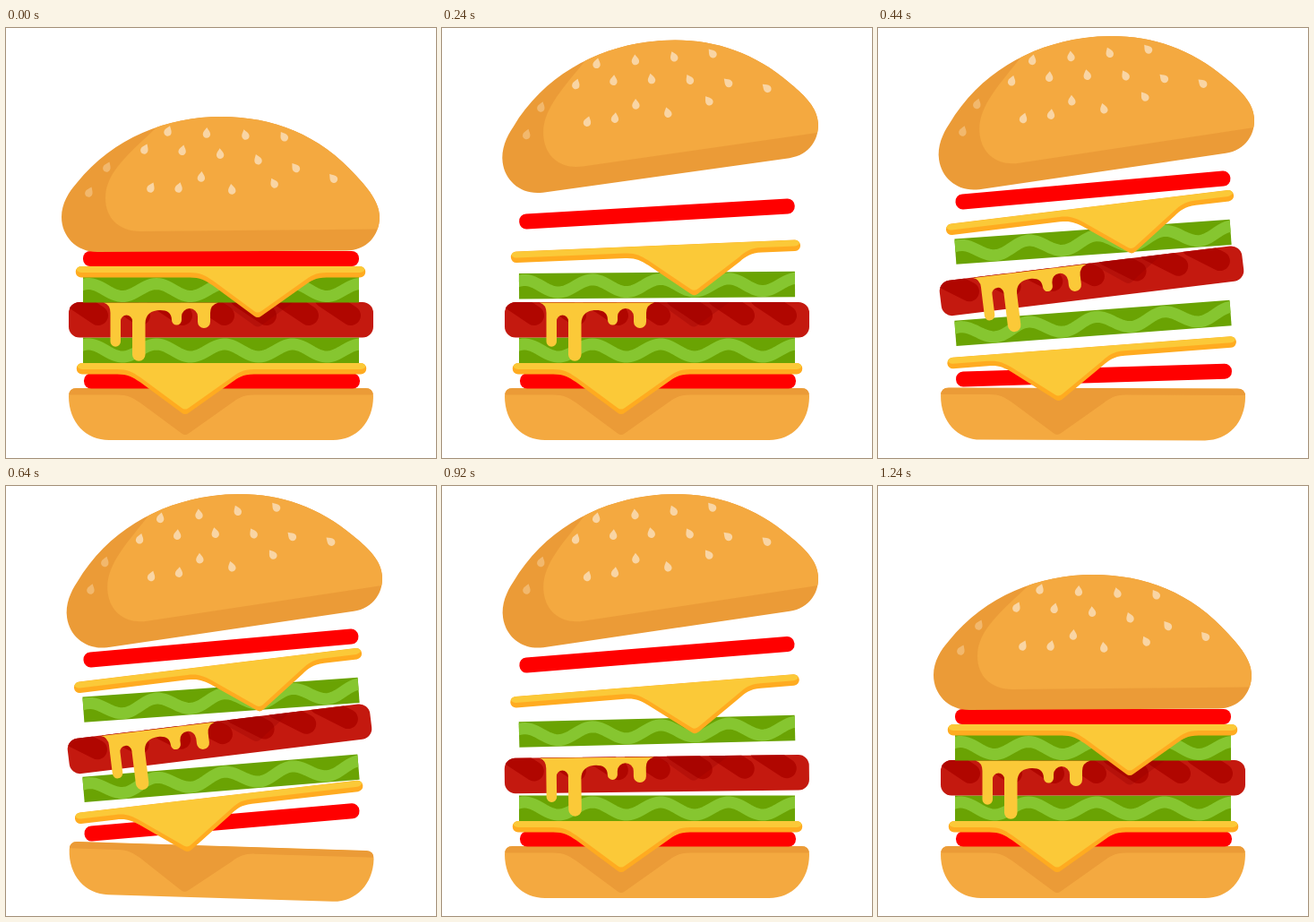
An HTML page that plays this animation: 480 px wide and 480 px high, repeating every 1360 ms.

```html
<!DOCTYPE html>
<html lang="en">
<head>
<meta charset="utf-8">
<title>Burger</title>
<style>
  html, body { margin: 0; width: 100%; height: 100%; overflow: hidden; background: #fff; }
  svg { display: block; width: 100vw; height: 100vh; }
</style>
</head>
<body>
<svg viewBox="0 0 480 480">
  <defs id="clips"></defs>
  <g id="burger"></g>
</svg>
<script>
const LOOP = 1360, STEP = 40, TURN = 600;
const BUN = '#f4a940', CRUST = '#eb9b37', SEED = '#f9d5a4';
const TOMATO = '#ff0000', CHEESE = '#fbc938', RIND = '#ffab20';
const LEAF = '#6aa303', LEAF_LIGHT = '#86c630', MEAT = '#c4190f', CHAR = '#b00600';

const clips = document.getElementById('clips');
const burger = document.getElementById('burger');
let clipCount = 0;

const clamp = (x, low, high) => Math.min(high, Math.max(low, x));
const path = (d, fill, extra = '') => `<path d="${d}" fill="${fill}" ${extra}/>`;
const bar = (x, y, w, h, r, fill) =>
  `<rect x="${x}" y="${y}" width="${w}" height="${h}" rx="${r}" fill="${fill}"/>`;

// Draws a shape and keeps its inner details inside the outline.
function clipped(shape, inner) {
  const id = 'clip' + clipCount++;
  clips.innerHTML += `<clipPath id="${id}">${shape}</clipPath>`;
  return shape + `<g clip-path="url(#${id})">${inner}</g>`;
}

// Lower edge of a slice, drawn right to left, with its corner hanging at x.
const fold = x => `H${x + 77}c-13 0-18 4-25 9l-48 34q-4 3-8 0l-46-34c-9-6-14-9-26-9`;

// Seeds lean towards the middle of the bun and fade in the shaded part.
function seed(x, y) {
  const lean = clamp((230 - x) * 0.4, -40, 25);
  return path('M0-6C2-3 4.2-1 4.2 1.6A4.2 4.2 0 0 1-4.2 1.6C-4.2-1-2-3 0-6Z', SEED,
    `transform="translate(${x} ${y}) rotate(${lean})" opacity="${x < 120 ? 0.5 : 1}"`);
}

function topBun() {
  const shell = 'M102 250C78 250 62 232 62 211C62 196 70 183 79 173C120 122 180 99 240 99' +
    'C298 99 350 119 391 165C403 178 417 194 417 211C417 232 402 248.5 380 248.5Z';
  const light = 'M168 111C140 138 111 160 111 190C111 212 126 227 150 227L420 224.5V90H168Z';
  let seeds = '';
  for (let i = 0; i < 4; i++) seeds += seed(181 + 43 * i, 115 + 2 * i);
  for (let i = 0; i < 6; i++) seeds += seed(155 + 42 * i, 135 + 1.3 * i * i);
  for (const p of ['113 155', '93 183', '162 178', '193 178', '218 166', '252 180', '299 173'])
    seeds += seed(...p.split(' ').map(Number));
  return clipped(path(shell, CRUST), path(light, BUN) + seeds);
}

const tomato = (x, y) => bar(x, y, 308, 17, 8, TOMATO);

function cheese(tip, x, y) {
  const d = `M${x + 6} ${y}h311a6.25 6.25 0 0 1 0 12.5${fold(tip)}H${x + 6}a6.25 6.25 0 0 1 0-12.5Z`;
  return clipped(path(d, RIND), path(d, CHEESE, 'transform="translate(0 -5.5)"'));
}

function lettuce(y) {
  let wave = '';
  for (let x = 84; x <= 396; x += 3) {
    const h = y + 14.5 - 7 * Math.cos((x - 168) / 76 * 2 * Math.PI);
    wave += (wave ? 'L' : 'M') + x + ' ' + h.toFixed(2);
  }
  return clipped(bar(86, y, 308, 28.5, 0, LEAF),
    path(wave, 'none', `stroke="${LEAF_LIGHT}" stroke-width="13"`));
}

function patty() {
  let marks = '';
  for (let x = 103; x < 400; x += 47) marks += `M${x - 30} 301L${x} 321`;
  const drip = 'M109 306.5H237Q228 309 228 318V328a7 7 0 0 1-14 0V322a9 9 0 0 0-18 0V326' +
    'a5.5 5.5 0 0 1-11 0C185 318 180 315 172 315C162 315 155.5 320 155.5 330V364.5a7.25 7.25 0 0 1-14.5 0' +
    'V327a6.5 6.5 0 0 0-13 0V350a5.75 5.75 0 0 1-11.5 0V318Q116.5 309 109 306.5Z';
  return clipped(bar(70, 306, 340, 39.5, 12, MEAT),
    path(marks, 'none', `stroke="${CHAR}" stroke-width="22" stroke-linecap="round"`) +
    path('M241 306L277 332Q281 335 285 332L321 306Z', '#960000', 'opacity=".3"')) + path(drip, CHEESE);
}

function bottomBun() {
  const d = 'M79 402H401Q410 402 410 411C410 440 391 460 365 460H115C89 460 70 440 70 411Q70 402 79 402Z';
  return clipped(path(d, BUN), path(`M60 400H420V409.5${fold(200)}H60Z`, CRUST));
}

// Bottom to top: art, pivot height, full lift, full tilt, travel time.
const layers = [
  [bottomBun(),          431,  0,     1.95],
  [tomato(87, 385.5),    394, -18.5, -4.95],
  [cheese(200, 79, 374), 405, -27.5, -6.6],
  [lettuce(345.5),       360, -33.5, -4.7],
  [patty(),              338, -43.5, -6.95],
  [lettuce(278),         292, -53.5, -4.05],
  [cheese(281, 78, 266), 297, -66.5, -6.95],
  [tomato(86, 249),      258, -76.5, -5.1],
  [topBun(),             180, -88.5, -8.05, 280]
].map(([art, pivot, lift, tilt, span = 200], i) => {
  const node = document.createElementNS('http://www.w3.org/2000/svg', 'g');
  node.innerHTML = art;
  burger.append(node);
  return { node, pivot, lift, tilt, span, delay: i * STEP };
});

const ease = x => 0.5 - 0.5 * Math.cos(Math.PI * clamp(x, 0, 1));

// Layers rise top first and settle bottom first, mirrored around TURN.
function draw(t) {
  const away = Math.abs(t - TURN);
  for (const { node, pivot, lift, tilt, span, delay } of layers) {
    const k = 1 - ease((away - delay) / span);
    node.setAttribute('transform', `translate(0 ${lift * k}) rotate(${tilt * k} 240 ${pivot})`);
  }
}

const start = performance.now();
function tick() {
  const t = (performance.now() - start) % LOOP;
  draw(Math.floor(t / STEP) * STEP);
  requestAnimationFrame(tick);
}
tick();
</script>
</body>
</html>
```
